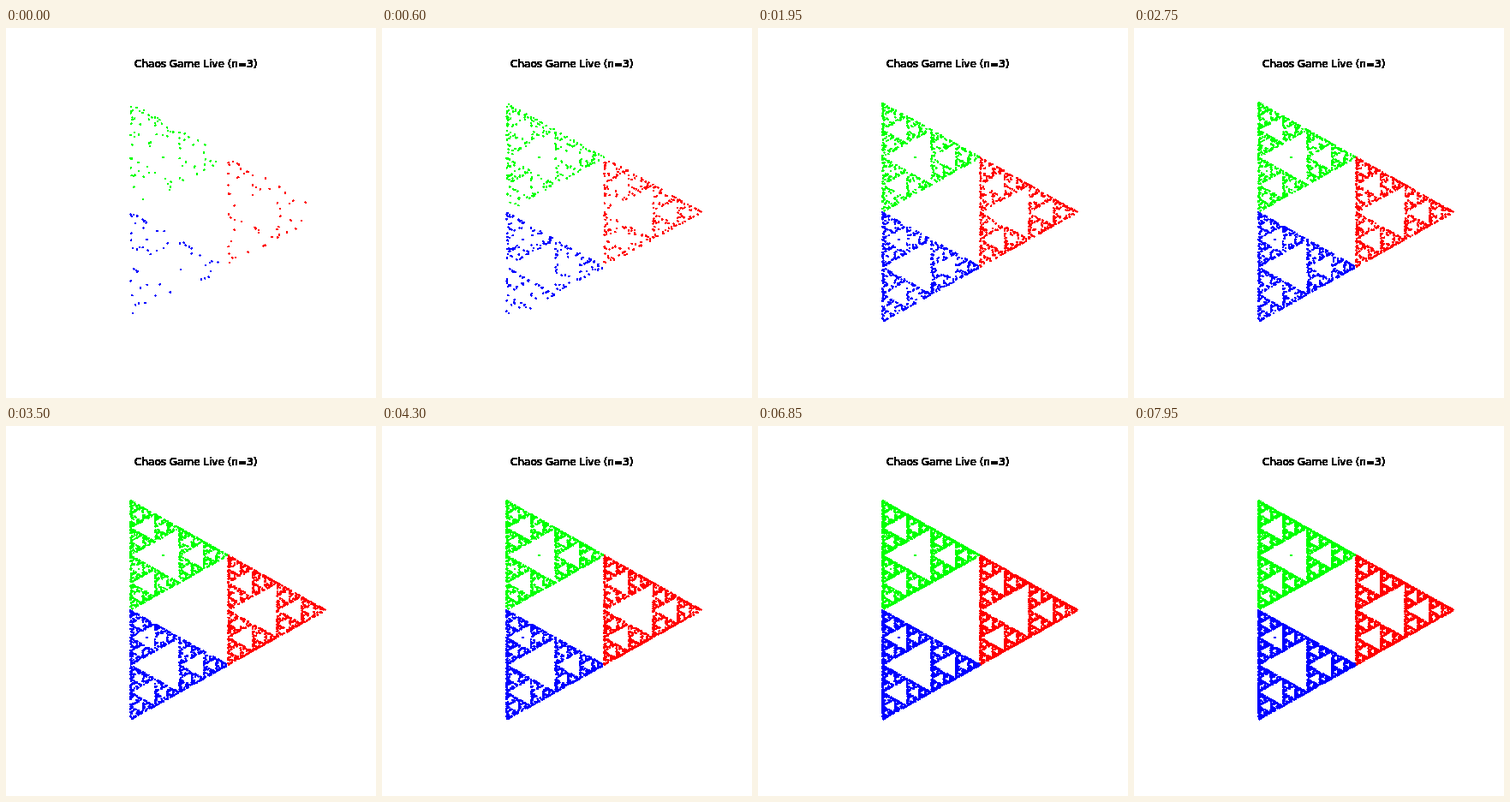
An HTML page with a canvas that plays this animation: 432x432 px, repeating every 8000 ms.

```html
<!DOCTYPE html>
<html lang="en">
<head>
<meta charset="utf-8">
<title>Chaos Game</title>
<style>
  html, body { margin: 0; width: 100%; height: 100%; overflow: hidden; background: #fff; }
  canvas { display: block; width: 432px; height: 432px; }
</style>
</head>
<body>
<canvas id="stage" width="432" height="432"></canvas>
<script>
const ctx = document.getElementById('stage').getContext('2d');

const LOOP = 8000, STEP = 50;
const FIRST_BATCH = 200, BATCH = 50;
const TOTAL = FIRST_BATCH + BATCH * (LOOP / STEP - 1);
const CENTER = { x: 221.4, y: 215 };
const SCALE = { x: 152.2, y: 147.8 };
const COLORS = ['#ff0000', '#00ff00', '#0000ff'];
const OPENING = [1, 2, 1];
const RADIUS = 1.3;
const TITLE_PASSES = 30;

const corners = COLORS.map((color, i) => {
  const angle = i * 2 * Math.PI / 3;
  return {
    x: CENTER.x + SCALE.x * Math.cos(angle),
    y: CENTER.y - SCALE.y * Math.sin(angle),
    color
  };
});

function seededRandom(seed) {
  return () => {
    seed = (seed + 0x6D2B79F5) | 0;
    let t = Math.imul(seed ^ (seed >>> 15), 1 | seed);
    t = (t + Math.imul(t ^ (t >>> 7), 61 | t)) ^ t;
    return ((t ^ (t >>> 14)) >>> 0) / 4294967296;
  };
}

// Each point lies halfway between the previous one and a random corner.
function playGame(count) {
  const random = seededRandom(11);
  let { x, y } = CENTER;
  return Array.from({ length: count }, (_, i) => {
    const corner = corners[i < OPENING.length ? OPENING[i] : Math.floor(random() * 3)];
    x = (x + corner.x) / 2;
    y = (y + corner.y) / 2;
    return { x, y, color: corner.color };
  });
}

const points = playGame(TOTAL);
let drawn = 0;

function reset() {
  ctx.fillStyle = '#fff';
  ctx.fillRect(0, 0, 432, 432);
  ctx.fillStyle = '#000';
  ctx.font = '12px "DejaVu Sans", sans-serif';
  ctx.textAlign = 'center';
  // Repeated passes harden the antialiased edges.
  for (let i = 0; i < TITLE_PASSES; i++) ctx.fillText('Chaos Game Live (n=3)', 221.7, 46);
  drawn = 0;
}

// A hard-edged dot: fills the pixels whose centres fall inside the circle.
function drawPoint({ x, y, color }) {
  ctx.fillStyle = color;
  for (let row = Math.round(y - RADIUS); row + 0.5 <= y + RADIUS; row++) {
    const half = Math.sqrt(Math.max(0, RADIUS ** 2 - (row + 0.5 - y) ** 2));
    const left = Math.round(x - half);
    ctx.fillRect(left, row, Math.round(x + half) - left, 1);
  }
}

function render(time) {
  const count = FIRST_BATCH + BATCH * Math.floor((time % LOOP) / STEP);
  if (count < drawn) reset();
  while (drawn < count) drawPoint(points[drawn++]);
}

const start = performance.now();
function tick() {
  render(Math.max(0, performance.now() - start));
  requestAnimationFrame(tick);
}

reset();
tick();
</script>
</body>
</html>
```
